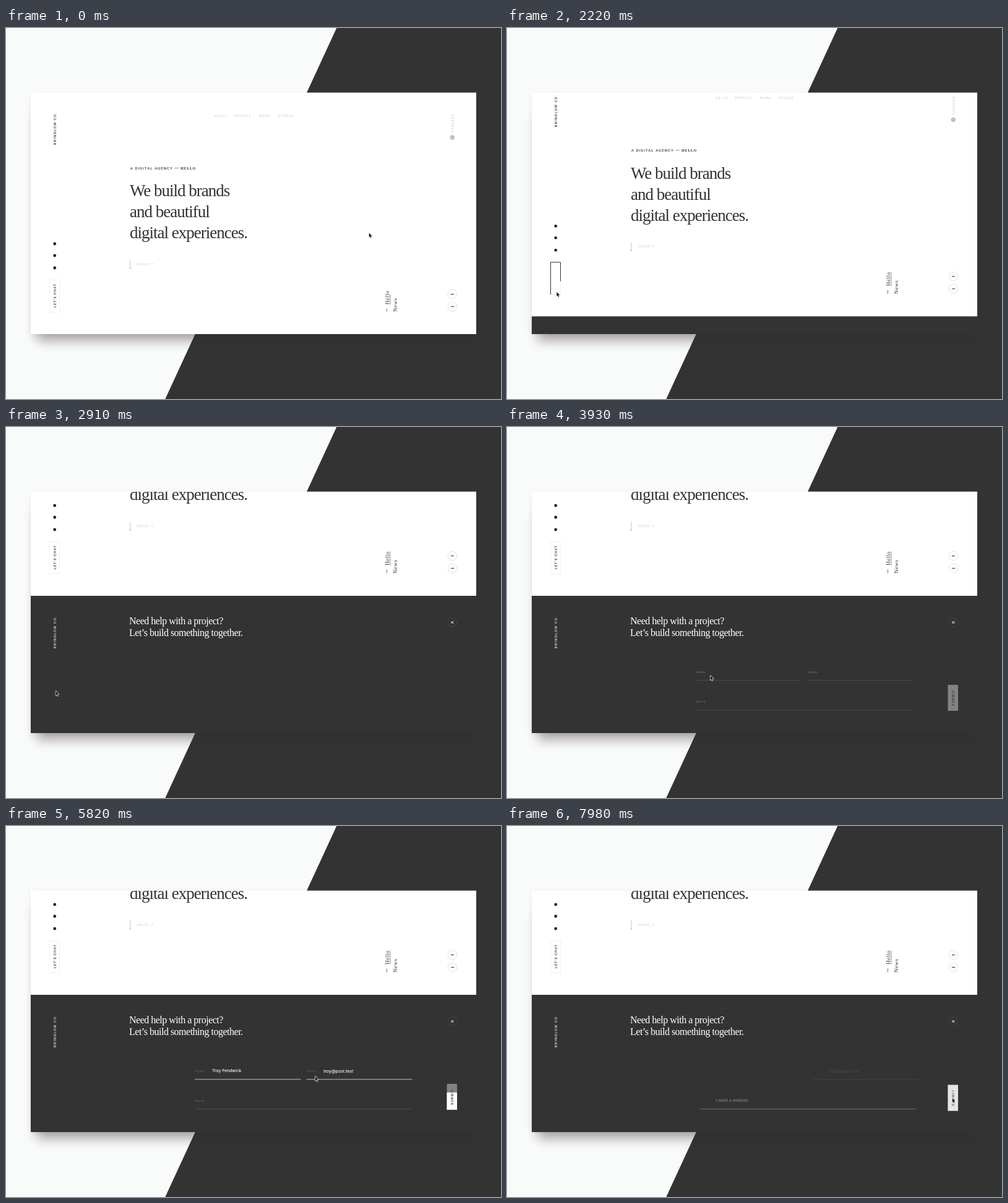
These frames come from a looping animation (800 px wide and 600 px high, 8 s). An HTML page with a canvas:

```html
<!DOCTYPE html>
<html lang="en">
<head>
<meta charset="utf-8">
<title>Agency contact panel</title>
<style>
html, body { margin: 0; width: 100%; height: 100%; overflow: hidden; background: #333; }
canvas { display: block; width: 800px; height: 600px; }
</style>
</head>
<body>
<canvas id="stage"></canvas>
<script>
const canvas = document.getElementById('stage');
const ctx = canvas.getContext('2d');
const dpr = window.devicePixelRatio || 1;
canvas.width = 800 * dpr;
canvas.height = 600 * dpr;

const LOOP = 8000;
const SCROLL = 222;
const CARD = { x: 40, y: 104.5, w: 720, h: 390.5 };
const DARK = '#333333';
const BRAND = 'BRINDLOW CO.';
const SANS = 'Roboto, sans-serif';
const SERIF = '"Liberation Serif", serif';
// Stretches of time in which the picture stands still mid-move
const HOLDS = [[300, 540], [2370, 2490]];

const clamp = v => Math.max(0, Math.min(1, v));
const span = (t, a, b) => clamp((t - a) / (b - a));
const lerp = (a, b, k) => a + (b - a) * k;
const easeOut = u => 1 - (1 - u) ** 3;
const inOut = n => u => u < 0.5 ? (2 * u) ** n / 2 : 1 - (2 - 2 * u) ** n / 2;
const inOut2 = inOut(2);
const inOut4 = inOut(4);

function withState(draw, { dx = 0, dy = 0, alpha = 1 } = {}) {
  if (alpha <= 0) return;
  ctx.save();
  ctx.translate(dx, dy);
  ctx.globalAlpha *= alpha;
  draw();
  ctx.restore();
}

function text(str, x, y, font, color, spacing = 0) {
  ctx.font = font;
  ctx.letterSpacing = spacing + 'px';
  ctx.fillStyle = color;
  ctx.fillText(str, x, y);
}

// Text that reads upwards, starting at the bottom
function upText(str, x, y, ...style) {
  ctx.save();
  ctx.translate(x, y);
  ctx.rotate(-Math.PI / 2);
  text(str, 0, 0, ...style);
  ctx.restore();
}

function rect(x, y, w, h, color) {
  ctx.fillStyle = color;
  ctx.fillRect(x, y, w, h);
}

function path(points, color, width = 1) {
  ctx.beginPath();
  points.forEach(([x, y]) => ctx.lineTo(x, y));
  ctx.strokeStyle = color;
  ctx.lineWidth = width;
  ctx.stroke();
}

function circle(x, y, r, color, outline) {
  ctx.beginPath();
  ctx.arc(x, y, r, 0, 7);
  if (outline) {
    ctx.strokeStyle = color;
    ctx.lineWidth = 1;
    ctx.stroke();
  } else {
    ctx.fillStyle = color;
    ctx.fill();
  }
}

function clipTo(x, y, w, h, draw) {
  ctx.save();
  ctx.beginPath();
  ctx.rect(x, y, w, h);
  ctx.clip();
  draw();
  ctx.restore();
}

function cardShadow(color, blur, dy, inset) {
  ctx.save();
  ctx.shadowColor = color;
  ctx.shadowBlur = blur * dpr;
  ctx.shadowOffsetY = dy * dpr;
  rect(CARD.x + inset, CARD.y + inset, CARD.w - 2 * inset, CARD.h - 2 * inset, '#fff');
  ctx.restore();
}

function drawBackdrop() {
  rect(0, 0, 800, 600, '#f9fafa');
  cardShadow('rgba(45,20,30,.33)', 18, 20, 10);
  cardShadow('rgba(0,0,0,.08)', 8, 1, 1);

  ctx.beginPath();
  [[534.3, 0], [800, 0], [800, 600], [257.3, 600]].forEach(p => ctx.lineTo(...p));
  ctx.fillStyle = DARK;
  ctx.fill();
  cardShadow('rgba(0,0,0,.07)', 18, 20, 10);
  rect(CARD.x, CARD.y, CARD.w, CARD.h, '#fff');
}

function drawChatButton(t) {
  const x = 70.5, y = 407.5, w = 16, h = 52;
  ctx.strokeStyle = '#f1f1f1';
  ctx.lineWidth = 1;
  ctx.strokeRect(x, y, w, h);

  const label = (dx, alpha) => withState(
    () => upText("LET'S CHAT", 80.7, 452, '500 5.5px ' + SANS, DARK, 0.95), { dx, alpha });
  clipTo(x, y, w, h, () => {
    if (t < 1300) {
      const u = span(t, 1030, 1275);
      label(7 * u, 1 - u);
    } else if (t < 2070) {
      const u = easeOut(span(t, 1350, 1700));
      label(-7 * (1 - u), u);
    } else if (t < 2250) {
      const u = span(t, 2080, 2200);
      label(-7 * u, 1 - u);
    } else {
      const u = span(t, 2300, 2560);
      label(7 * (1 - u), u);
    }
  });

  const drawn = span(t, 1253, 1800) - span(t, 2142, 2431);
  if (drawn > 0) {
    const length = 2 * (w + h);
    ctx.save();
    ctx.setLineDash([drawn * length, length]);
    path([[x, y + h], [x, y], [x + w, y], [x + w, y + h], [x, y + h]], DARK);
    ctx.restore();
  }
}

function drawHello(t) {
  const u = easeOut(span(t, 0, 300));
  const bottom = lerp(447.3, 445.7, u);
  path([[615.5, 458.5], [615.5, lerp(454, 452.5, u)]], '#555', 0.8);
  upText('Hello', 619, bottom, '9px ' + SERIF, '#333', 0.5);
  path([[620.7, bottom], [620.7, bottom - lerp(16, 22.5, u)]], '#555', 0.7);
  upText('News', 632, 459, '9px ' + SERIF, '#333', 0.5);
}

function drawHome(t) {
  upText(BRAND, 80.8, 189, '500 5.6px ' + SANS, DARK, 1.2);

  [['HELLO', 336.7], ['PROFILE', 368.7], ['WORK', 408.7], ['STUDIO', 439.7]]
    .forEach(([s, x]) => text(s, x, 143.8, '5.2px ' + SANS, '#c6c6c6', 1.1));

  upText('CAREERS', 723.6, 169, '5.2px ' + SANS, '#c2c2c2', 1.2);
  circle(721.3, 177, 3.7, '#bdbdbd');
  upText('2', 722.6, 178, '3.6px ' + SANS, '#fff');

  text('A DIGITAL AGENCY', 200.8, 228.7, '500 6px ' + SANS, DARK, 1.05);
  path([[272.5, 226.5], [279, 226.5]], '#777', 0.8);
  text('HELLO', 282, 228.7, 'bold 6px "Noto Serif", serif', DARK, 0.7);

  ['We build brands', 'and beautiful', 'digital experiences.']
    .forEach((s, i) => text(s, 200, 272.2 + 34 * i, '27px ' + SERIF, DARK, -1));

  path([[200.8, 375], [200.8, 389.5]], '#c4c4c4', 0.9);
  path([[199.8, 387.5], [200.8, 389.5], [201.8, 387.5]], '#aaa', 0.7);
  text('PROVE IT', 212, 384, '4.5px ' + SANS, '#cacaca', 0.95);

  [349, 368, 388].forEach(y => circle(78.7, y, 2.4, '#222'));
  drawChatButton(t);
  drawHello(t);

  [[430.5, 719, 1], [450.5, 724, -1]].forEach(([y, tip, side]) => {
    circle(721.4, y, 7.3, '#e1e1e1', true);
    path([[719, y], [724, y]], '#222', 0.9);
    path([[tip + side, y - 1], [tip, y], [tip + side, y + 1]], '#444', 0.5);
  });
}

const FIELDS = [
  { label: 'NAME', value: 'Troy Fendwick', x: 305.5, y: 396, valueX: 333, width: 171, baseline: 398,
    enter: 2910, type: 4230, leave: 7620 },
  { label: 'EMAIL', value: 'troy@post.test', x: 485.5, y: 396, valueX: 513.3, width: 171, baseline: 398.8,
    enter: 3000, type: 5370, leave: 7710 },
  { label: 'NOTE', value: 'I want a website.', x: 306, y: 444, valueX: 332, width: 350.5, baseline: 446,
    enter: 3090, type: 6360, leave: 7795 }
];

// Fade and offset of a part that slides in, then slides out
function presence(t, enter, leave, enterTime = 350) {
  const a = easeOut(span(t, enter, enter + enterTime));
  const b = span(t, leave, leave + 300);
  return { alpha: a * (1 - b), shift: -8 * (1 - a) + 9 * b };
}

function drawField(f, t) {
  const { alpha, shift } = presence(t, f.enter, f.leave);
  withState(() => {
    const lineY = f.y + 13.7;
    const typed = span(t, f.type, f.type + 465);
    const grown = easeOut(span(t, f.type, f.type + 420));
    path([[f.x, lineY], [f.x + f.width, lineY]], '#4c4c4c');
    if (grown > 0) rect(f.x, lineY - 0.8, f.width * grown, 1.6, '#8e8e8e');
    text(f.label, f.x + 0.3, f.y + 1.6, '4.3px ' + SANS, grown > 0.3 ? '#666' : '#7c7c7c', 1);
    if (typed > 0) {
      const font = '500 6.8px Inter, sans-serif';
      ctx.font = font;
      ctx.letterSpacing = '0px';
      const width = ctx.measureText(f.value).width + 1;
      clipTo(f.valueX - 1, f.y - 8, 1 + width * typed, 16,
        () => text(f.value, f.valueX, f.baseline, font, '#fff'));
    }
  }, { dx: shift, alpha });
}

function drawSubmit(t) {
  const { alpha, shift } = presence(t, 3250, 7925, 400);
  const filled = FIELDS.reduce((sum, f) => sum + easeOut(span(t, f.type, f.type + 450)), 0) / 3;
  withState(() => {
    rect(712.5, 417, 16.5, 42, '#828282');
    rect(712.5, 459 - 42 * filled, 16.5, 42 * filled, '#fff');
    upText('SUBMIT', 722.7, 451, '500 5.3px ' + SANS, DARK, 1.2);
  }, { dy: Math.abs(shift), alpha });
}

// Drawn where it rests, with its top edge at y = 273
function drawPanel(t) {
  rect(CARD.x, 273, CARD.w, 240, DARK);
  upText(BRAND, 80.8, 358, '500 5.6px ' + SANS, '#e4e4e4', 1.2);

  circle(721.3, 316, 7.3, '#454545', true);
  path([[719.2, 313.9], [723.4, 318.1]], '#fff', 1);
  path([[723.4, 313.9], [719.2, 318.1]], '#fff', 1);

  ['Need help with a project?', 'Let’s build something together.'].forEach((s, i) => {
    const { alpha, shift } = presence(t, 2440 + 80 * i, LOOP);
    withState(() => text(s, 199, 319 + 18.5 * i, '16px ' + SERIF, '#fff', -0.5), { dx: shift, alpha });
  });

  FIELDS.forEach(f => drawField(f, t));
  drawSubmit(t);
}

const MOVES = [
  { from: 0, to: 1200, x: 80.4, y: 427, ease: easeOut },
  { from: 3160, to: 3930, x: 328.8, y: 402.2, ease: inOut2 },
  { from: 4640, to: 5080, x: 499.8, y: 405, ease: inOut2 },
  { from: 5820, to: 6190, x: 497.8, y: 449, ease: inOut2 },
  { from: 6840, to: 7460, x: 719.8, y: 440, ease: inOut2 }
];

function drawCursor(t) {
  let x = 588, y = 331.3;
  for (const m of MOVES) {
    const k = m.ease(span(t, m.from, m.to));
    x = lerp(x, m.x, k);
    y = lerp(y, m.y, k);
  }
  ctx.save();
  ctx.translate(x, y);
  ctx.beginPath();
  [[0, 0], [0, 7], [1.6, 5.5], [2.7, 8.2], [3.8, 7.7], [2.7, 5.1], [4.9, 5]]
    .forEach(p => ctx.lineTo(...p));
  ctx.closePath();
  ctx.lineJoin = 'round';
  ctx.strokeStyle = '#fff';
  ctx.lineWidth = 1.2;
  ctx.stroke();
  ctx.fillStyle = '#111';
  ctx.fill();
  ctx.restore();
}

function render(time) {
  let t = time % LOOP;
  for (const [a, b] of HOLDS) if (t >= a && t < b) t = a;

  ctx.setTransform(dpr, 0, 0, dpr, 0, 0);
  drawBackdrop();
  const scroll = SCROLL * inOut4(span(t, 2020, 2584));
  clipTo(CARD.x, CARD.y, CARD.w, CARD.h, () => {
    withState(() => drawHome(t), { dy: -scroll });
    if (scroll > 0) withState(() => drawPanel(t), { dy: SCROLL - scroll });
  });
  drawCursor(t);
}

const start = performance.now();
function tick() {
  render(performance.now() - start);
  requestAnimationFrame(tick);
}
tick();
</script>
</body>
</html>
```
